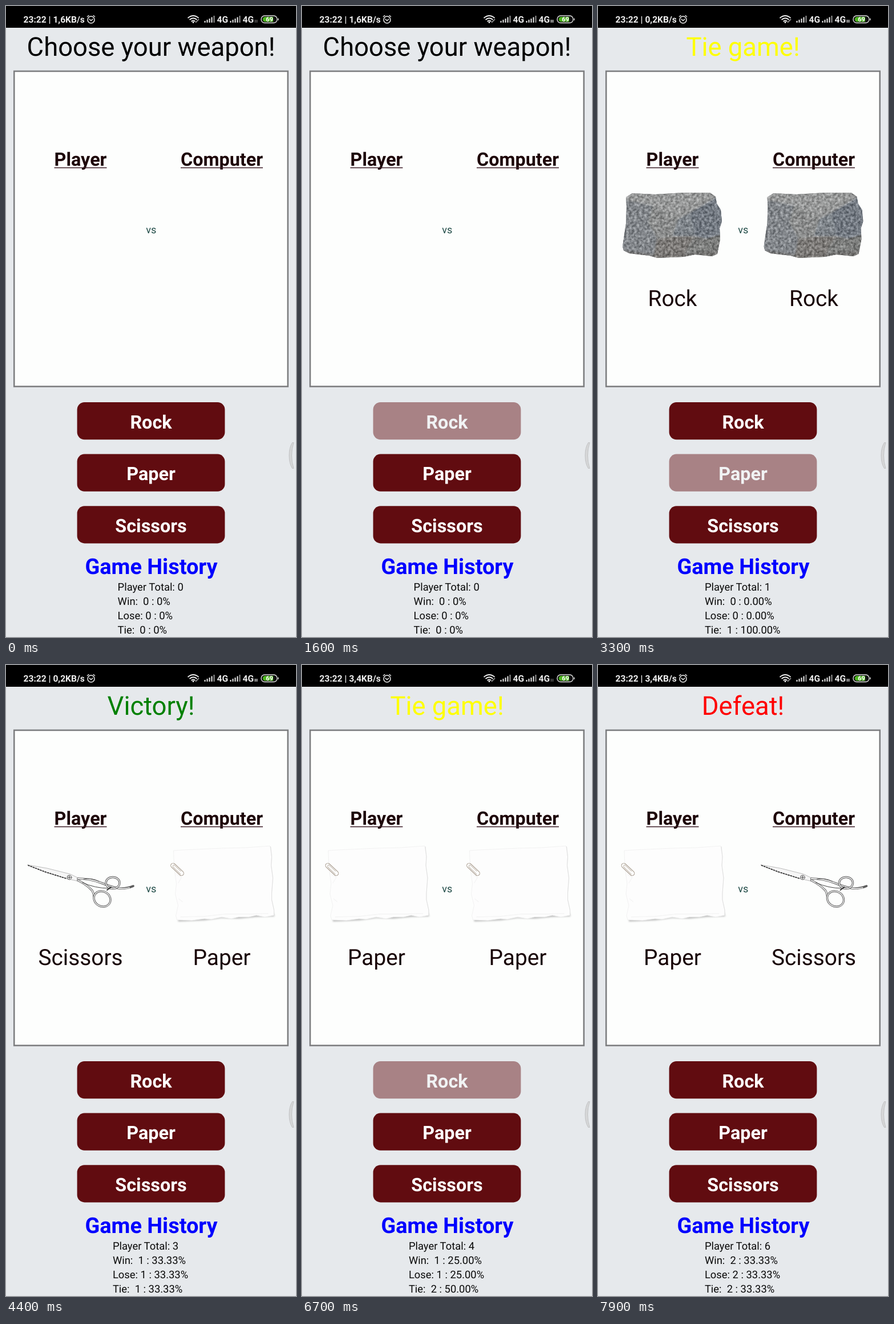
Animation of 508x1102 px, one loop 8000 ms. Source, as an HTML page:

```html
<!DOCTYPE html>
<html lang="en">
<head>
<meta charset="utf-8">
<title>Rock, paper, scissors</title>
<style>
html, body { margin: 0; width: 100%; height: 100%; overflow: hidden; background: #e6e9ec; }
svg { display: block; width: 100%; height: 100%; }
text { font-family: Roboto, sans-serif; white-space: pre; text-rendering: geometricPrecision; }
.mid { text-anchor: middle; }
.bold { font-weight: 700; }
.title { font-size: 45.4px; }
.name { font-size: 32.34px; fill: #1d0508; }
.pick { font-size: 38.8px; fill: #180406; }
.stat { font-size: 18.4px; fill: #0a0a0a; }
.status { font-size: 15.6px; font-weight: 600; fill: #eee; }
</style>
</head>
<body>
<svg viewBox="0 0 508 1102" preserveAspectRatio="none">
  <defs>
    <path id="rockShape" d="M49 334L60 327 100 329 150 326 196 326 206 333 208 345 215 356 217 376 213 388 214 407 209 433 200 437 170 434 150 438 104 440 90 436 55 432 45 427 43 420 46 400 49 380 50 350Z"/>
    <clipPath id="rockClip"><use href="#rockShape"/></clipPath>
    <filter id="soft" x="-10%" y="-10%" width="120%" height="130%">
      <feGaussianBlur stdDeviation="1.6"/>
    </filter>
    <filter id="grain" x="0" y="0" width="100%" height="100%" color-interpolation-filters="sRGB">
      <feTurbulence type="fractalNoise" baseFrequency=".22" numOctaves="3" seed="4"/>
      <feColorMatrix values="1.6 0 0 0 -.3  1.6 0 0 0 -.3  1.6 0 0 0 -.28  0 0 0 0 .36"/>
    </filter>

    <g id="Rock">
      <use href="#rockShape" fill="#83898b"/>
      <g clip-path="url(#rockClip)">
        <g filter="url(#soft)">
          <path d="M40 320H212L206 336 190 344 162 360 140 372 124 362 96 348 72 343 44 340Z" fill="#a4a6a3"/>
          <path d="M44 338L72 343 96 348 88 378 103 402 98 444H36Z" fill="#858b8f"/>
          <path d="M96 348L124 362 140 372 130 402 103 406 88 378Z" fill="#929491"/>
          <path d="M140 372L162 360 170 402 130 404Z" fill="#7c858b"/>
          <path d="M162 360L206 334 224 356V402L190 406 170 402Z" fill="#6c7680"/>
          <path d="M103 406L130 402 170 402 158 420 150 444H96Z" fill="#7d7972"/>
          <path d="M170 402L190 406 220 398V444H148L158 420Z" fill="#7a7b77"/>
          <path d="M40 426L100 434 150 434 212 428V444H40Z" fill="#625e58" opacity=".6"/>
        </g>
        <path d="M72 344L96 349 124 363 140 373 162 361 206 335M140 373L130 402M103 406L130 402 170 403 190 407" fill="none" stroke="#c4c5c1" opacity=".6"/>
        <rect x="40" y="322" width="180" height="120" filter="url(#grain)"/>
      </g>
    </g>

    <g id="Paper">
      <path d="M54 440L100 442 160 438 221 432 223 439 191 440 160 443 130 442 100 446 54 448Z" fill="#888" opacity=".55" filter="url(#soft)"/>
      <path d="M46 324L62 323 130 320 172 319 215 316 218 335 217 350 220 372 218 398 218 410 222 428 222 437 206 440 191 437 178 440 160 440 147 443 130 440 112 444 100 443 78 446 52 445 50 438 54 420 49 400 51 382 47 352Z" fill="#fdfdfd" stroke="#efefef" stroke-width=".8"/>
      <path d="M216 317L218 335 217 350 220 372 218 398 218 410 222 428V437" fill="none" stroke="#dedede"/>
      <path d="M58 440L100 439 136 435 180 435 212 434M52 366L60 371 54 381M55 408L62 414" fill="none" stroke="#f5f5f5" stroke-width="1.3"/>
      <g transform="translate(52.5 357) rotate(43)" fill="none" stroke="#a99d90" stroke-width="1.1">
        <rect x="-14" y="-4" width="28" height="8" rx="4"/>
        <path d="M10 2H-8a2 2 0 0 1 0-4H7" stroke="#c9c0b6"/>
      </g>
    </g>

    <g id="Scissors" fill="none" stroke="#5d5d5d" stroke-linecap="round">
      <path d="M38 349L72 355 112 365 131 374 128 378 106 373 68 362Z" fill="#f6f6f6" stroke="#aaa" stroke-width=".8"/>
      <path d="M39 350L68 361 106 373" stroke="#333" stroke-width="1.7" stroke-dasharray="2 2.5"/>
      <path d="M126 376Q142 384 151 394Q154 400 154 404" stroke-width="3.6"/>
      <path d="M126 376Q142 384 151 394Q154 400 154 404" stroke="#eee" stroke-width="1.8"/>
      <path d="M126 373Q148 373 168 381T198 390Q211 391 223 386" stroke-width="3.6"/>
      <path d="M126 373Q148 373 168 381T198 390Q208 391 216 389" stroke="#eee" stroke-width="1.8"/>
      <path d="M136 374Q150 371 163 378M134 380Q156 390 180 390" stroke="#444"/>
      <g id="rings" stroke-width="3.4">
        <ellipse cx="187" cy="380.500" rx="12" ry="10"/>
        <ellipse cx="168.500" cy="408.500" rx="15" ry="13" transform="rotate(30 168.500 408.500)"/>
      </g>
      <g stroke="#eee" stroke-width="1.5">
        <ellipse cx="187" cy="380.500" rx="12" ry="10"/>
        <ellipse cx="168.500" cy="408.500" rx="15" ry="13" transform="rotate(30 168.500 408.500)"/>
      </g>
      <path d="M177 393L184 388" stroke="#333" stroke-width="2"/>
      <circle cx="111" cy="371" r="4" fill="#e6e6e6" stroke="#666"/>
      <path d="M108.500 371H113.500M111 368.500V373.500" stroke="#555"/>
    </g>

    <g id="bars" fill="#eee">
      <path d="M0 26h2v3h-2zM4 24h2v5h-2zM8 22h2v7h-2zM12 19.500h2v9.500h-2z"/>
      <path d="M16 17h2v12h-2z" fill="#999"/>
    </g>
  </defs>

  <rect width="508" height="1102" fill="#e6e9ec"/>
  <rect width="508" height="38"/>
  <text id="clock" class="status" x="30.500" y="29"></text>
  <g fill="none" stroke="#eee" stroke-width="1.5" stroke-linecap="round">
    <circle cx="149" cy="24" r="6"/>
    <path d="M146 23L149 25.500 152 23M142.500 18.500L145 16.500M155.500 18.500L153 16.500"/>
  </g>
  <g fill="none" stroke="#eee" stroke-width="1.8">
    <path d="M318.500 21Q328 13 337.500 21M321.500 24Q328 18.500 334.500 24M324.500 27Q328 24 331.500 27"/>
    <path d="M332 29L338 23" stroke="#bbb" stroke-width="1.3"/>
  </g>
  <circle cx="328" cy="28.500" r="1.5" fill="#eee"/>
  <use href="#bars" x="347.500"/>
  <text class="status" x="369.500" y="29">4G</text>
  <use href="#bars" x="392.500"/>
  <text class="status" x="414.500" y="29">4G</text>
  <path id="traffic" d="M436.500 24V29M439.500 24V29" stroke="#eee" stroke-width="1.5"/>
  <rect x="447" y="17" width="28" height="12.500" rx="6" fill="#111" stroke="#ddd" stroke-width="1.4"/>
  <path d="M454 19H468V27.500H454A4.250 4.250 0 0 1 454 19Z" fill="#4cb51e"/>
  <path d="M477 21.500V25" stroke="#ddd" stroke-width="1.4"/>
  <text class="mid bold" x="461.500" y="27.200" font-size="11" fill="#fff">69</text>

  <text id="title" class="title mid" x="254" y="87"></text>
  <rect x="14.240" y="113.900" width="479.520" height="550.600" fill="#fdfefd" stroke="#7d7e80" stroke-width="2.6"/>
  <text class="name bold mid" x="130.500" y="279">Player</text>
  <text class="name bold mid" x="378" y="279">Computer</text>
  <path d="M84.500 282.500H176.500M306 282.500H450" stroke="#3a1a24" stroke-width="1.6"/>
  <text class="mid" x="254.300" y="397" font-size="18.100" fill="#1f4a46">vs</text>

  <g id="round">
    <use id="playerImage"/>
    <use id="computerImage" x="247.500"/>
    <text id="playerPick" class="pick mid" x="130.500" y="524"></text>
    <text id="computerPick" class="pick mid" x="378" y="524"></text>
  </g>

  <g id="buttons"></g>
  <path d="M504 762.500H501.500Q496 771 496 785T501.500 807.500H504Q500.500 797 500.500 785T504 762.500Z" fill="#d6d7d8" stroke="#b9babb" stroke-width=".8"/>
  <text class="bold mid" x="254.500" y="991.500" font-size="37.900" fill="#00f">Game History</text>
  <g id="history"></g>
</svg>

<script>
const LOOP = 8000;
const PICKS = ['Rock', 'Paper', 'Scissors'];
const COLORS = { Tie: '#ff0', Win: '#008000', Lose: '#f00' };
const TITLES = { Tie: 'Tie game!', Win: 'Victory!', Lose: 'Defeat!' };

// release time, player, computer, result
const rounds = [
  [1700, 'Rock', 'Rock', 'Tie'],
  [3400, 'Paper', 'Scissors', 'Lose'],
  [4150, 'Scissors', 'Paper', 'Win'],
  [5750, 'Paper', 'Paper', 'Tie'],
  [6800, 'Rock', 'Scissors', 'Win'],
  [7550, 'Paper', 'Scissors', 'Lose']
];
const speeds = [[0, '1,6'], [2700, '0,2'], [6700, '3,4']];
const quietTraffic = [[0, 800], [2100, 2900], [6600, 7500]];

const $ = id => document.getElementById(id);

function add(parent, tag, attrs, text = '') {
  const el = document.createElementNS('http://www.w3.org/2000/svg', tag);
  for (const key in attrs) el.setAttribute(key, attrs[key]);
  el.textContent = text;
  return parent.appendChild(el);
}

const buttons = PICKS.map((pick, i) => {
  const group = add($('buttons'), 'g', { transform: `translate(0 ${i * 90.6})` });
  add(group, 'rect', { x: 124.6, y: 692, width: 258.8, height: 65.2, rx: 12.9, fill: '#610c10' });
  add(group, 'text', { class: 'bold mid', x: 254, y: 737.8, 'font-size': 32.34, fill: '#fff' }, pick);
  return group;
});

const lines = [0, 1, 2, 3].map(i => add($('history'), 'text', { class: 'stat', y: 1021.2 + i * 25 }));

function setText(el, text) {
  if (el.textContent !== text) el.textContent = text;
}

function pressOpacity(dt) {
  if (dt < -200 || dt > 250) return 1;
  if (dt < 0) return 1 - 0.8 * Math.min(1, (dt + 200) / 150);
  return 0.2 + 0.8 * dt / 250;
}

function showHistory(played) {
  const total = played.length;
  const rate = n => total ? (100 * n / total).toFixed(2) : '0';
  setText(lines[0], `Player Total: ${total}`);
  ['Win:  ', 'Lose: ', 'Tie:  '].forEach((label, i) => {
    const count = played.filter(r => label.startsWith(r[3])).length;
    setText(lines[i + 1], `${label}${count} : ${rate(count)}%`);
  });
  lines.forEach(line => line.setAttribute('x', total ? 186.9 : 195.6));
}

function showRound(round) {
  $('round').style.display = round ? '' : 'none';
  setText($('title'), round ? TITLES[round[3]] : 'Choose your weapon!');
  $('title').setAttribute('fill', round ? COLORS[round[3]] : '#000');
  if (!round) return;
  ['player', 'computer'].forEach((side, i) => {
    $(side + 'Image').setAttribute('href', '#' + round[i + 1]);
    setText($(side + 'Pick'), round[i + 1]);
  });
}

let shown = -1;
function render(t) {
  const played = rounds.filter(r => t >= r[0]);
  if (played.length !== shown) {
    shown = played.length;
    showRound(played[shown - 1]);
    showHistory(played);
  }
  buttons.forEach((button, i) => {
    const presses = rounds.filter(r => r[1] === PICKS[i]);
    button.setAttribute('opacity', Math.min(...presses.map(r => pressOpacity(t - r[0]))));
  });
  const speed = speeds.filter(s => t >= s[0]).pop()[1];
  setText($('clock'), `23:22 | ${speed}KB/s`);
  const quiet = quietTraffic.some(([from, to]) => t >= from && t < to);
  $('traffic').setAttribute('opacity', quiet ? 0.45 : 1);
}

const start = performance.now();
function tick() {
  render((performance.now() - start) % LOOP);
  requestAnimationFrame(tick);
}
tick();
</script>
</body>
</html>
```
